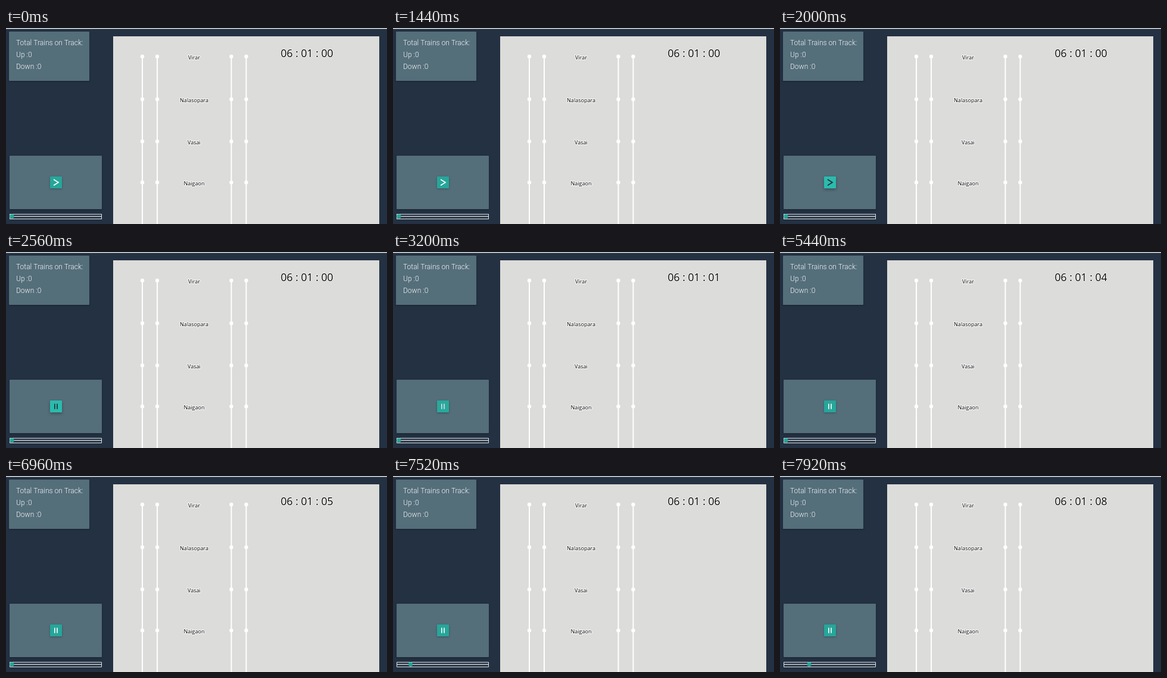
These frames come from a looping animation (640 px wide and 330 px high, 8000 ms). An HTML page with a canvas:

```html
<!DOCTYPE html>
<html lang="en">
<head>
<meta charset="utf-8">
<title>Train tracker</title>
<style>
  html, body { margin: 0; width: 100%; height: 100%; overflow: hidden; background: #233142; }
  canvas { display: block; }
</style>
</head>
<body>
<canvas id="stage" width="640" height="330"></canvas>
<script>
const ctx = document.getElementById('stage').getContext('2d');
const LOOP = 8000;
const STEP = 80;
const STATIONS = [['Virar', 48], ['Nalasopara', 120], ['Vasai', 191], ['Naigaon', 260]];
const TRACKS = [229, 254, 378.5, 403.5];
const TICKS = [3040, 3840, 4640, 5440, 6240, 7040, 7680, 7920];
const KNOB_PATH = [[6960, 10], [7200, 20], [7440, 20], [7520, 29.5], [7600, 29.5], [7920, 49]];

const clamp = v => Math.max(0, Math.min(1, v));
const easeOut = v => 1 - (1 - clamp(v)) ** 2;
const mix = (a, b, k) => `rgb(${a.map((v, i) => Math.round(v + (b[i] - v) * k))})`;

function along(path, t) {
  if (t <= path[0][0]) return path[0][1];
  for (let i = 1; i < path.length; i++) {
    const [t0, x0] = path[i - 1], [t1, x1] = path[i];
    if (t <= t1) return x0 + (x1 - x0) * (t - t0) / (t1 - t0);
  }
  return path[path.length - 1][1];
}

function rect(x, y, w, h, color) {
  ctx.fillStyle = color;
  ctx.fillRect(x, y, w, h);
}

function dot(x, y, r, color) {
  ctx.fillStyle = color;
  ctx.beginPath();
  ctx.arc(x, y, r, 0, Math.PI * 2);
  ctx.fill();
}

function card(x, y, w, h, color, blur, drop, radius = 1) {
  ctx.save();
  ctx.shadowColor = 'rgba(0,0,0,0.3)';
  ctx.shadowBlur = blur;
  ctx.shadowOffsetY = drop;
  ctx.fillStyle = color;
  ctx.beginPath();
  ctx.roundRect(x, y, w, h, radius);
  ctx.fill();
  ctx.restore();
}

function label(text, x, y, size, halo) {
  ctx.font = `${size}px "Open Sans", sans-serif`;
  ctx.textAlign = 'center';
  ctx.lineJoin = 'round';
  ctx.lineWidth = halo;
  ctx.strokeStyle = '#fff';
  ctx.strokeText(text, x, y);
  ctx.fillStyle = '#000';
  ctx.fillText(text, x, y);
}

function drawTotals() {
  card(5, 6, 135, 83, '#546e7a', 3, 1);
  ctx.font = '300 12px Roboto, sans-serif';
  ctx.textAlign = 'left';
  ctx.fillStyle = '#f4f6f7';
  ['Total Trains on Track:', 'Up :0', 'Down :0'].forEach((s, i) => ctx.fillText(s, 17, 29 + i * 20));
}

function drawMap(t) {
  rect(180, 14, 447, 316, '#dcdcda');
  for (const x of TRACKS) {
    rect(x - 1, 48, 2, 282, '#fff');
    for (const [, y] of STATIONS) dot(x, y, 3.2, '#fff');
  }
  for (const [name, y] of STATIONS) label(name, 316, y + 5, 9, 2);
  const seconds = TICKS.filter(at => t >= at).length;
  label(`06 : 01 : 0${seconds}`, 505.5, 49, 17.6, 1.6);
}

function drawButton(t) {
  const hover = easeOut((t - 1760) / 240) * (1 - easeOut((t - 2960) / 400));
  card(74, 250, 20, 20, mix([38, 166, 154], [43, 187, 173], hover), 3 + 2 * hover, 1 + hover);
  const ink = mix([255, 255, 255], [28, 45, 52], hover);
  if (t < 2240) {
    ctx.strokeStyle = ink;
    ctx.lineWidth = 1.6;
    ctx.lineJoin = 'miter';
    ctx.beginPath();
    ctx.moveTo(80, 255);
    ctx.lineTo(88, 260);
    ctx.lineTo(80, 265);
    ctx.stroke();
  } else {
    rect(81, 255.5, 1.6, 9, ink);
    rect(85.2, 255.5, 1.6, 9, ink);
  }
}

function drawSlider(t) {
  ctx.strokeStyle = '#dfe3e5';
  ctx.lineWidth = 1;
  ctx.strokeRect(6.5, 313.5, 154, 8);
  rect(7, 316.5, 153, 1.6, '#c2c5c8');
  dot(along(KNOB_PATH, t), 317.2, 3.6, '#26a69a');
}

function frame(now) {
  const t = Math.floor((now % LOOP) / STEP) * STEP;
  rect(0, 0, 640, 330, '#233142');
  rect(0, 0, 640, 1.4, '#eef0f0');
  drawTotals();
  drawMap(t);
  card(6, 215, 155, 90, '#546e7a', 3, 1);
  drawButton(t);
  drawSlider(t);
  requestAnimationFrame(frame);
}
requestAnimationFrame(frame);
</script>
</body>
</html>
```
